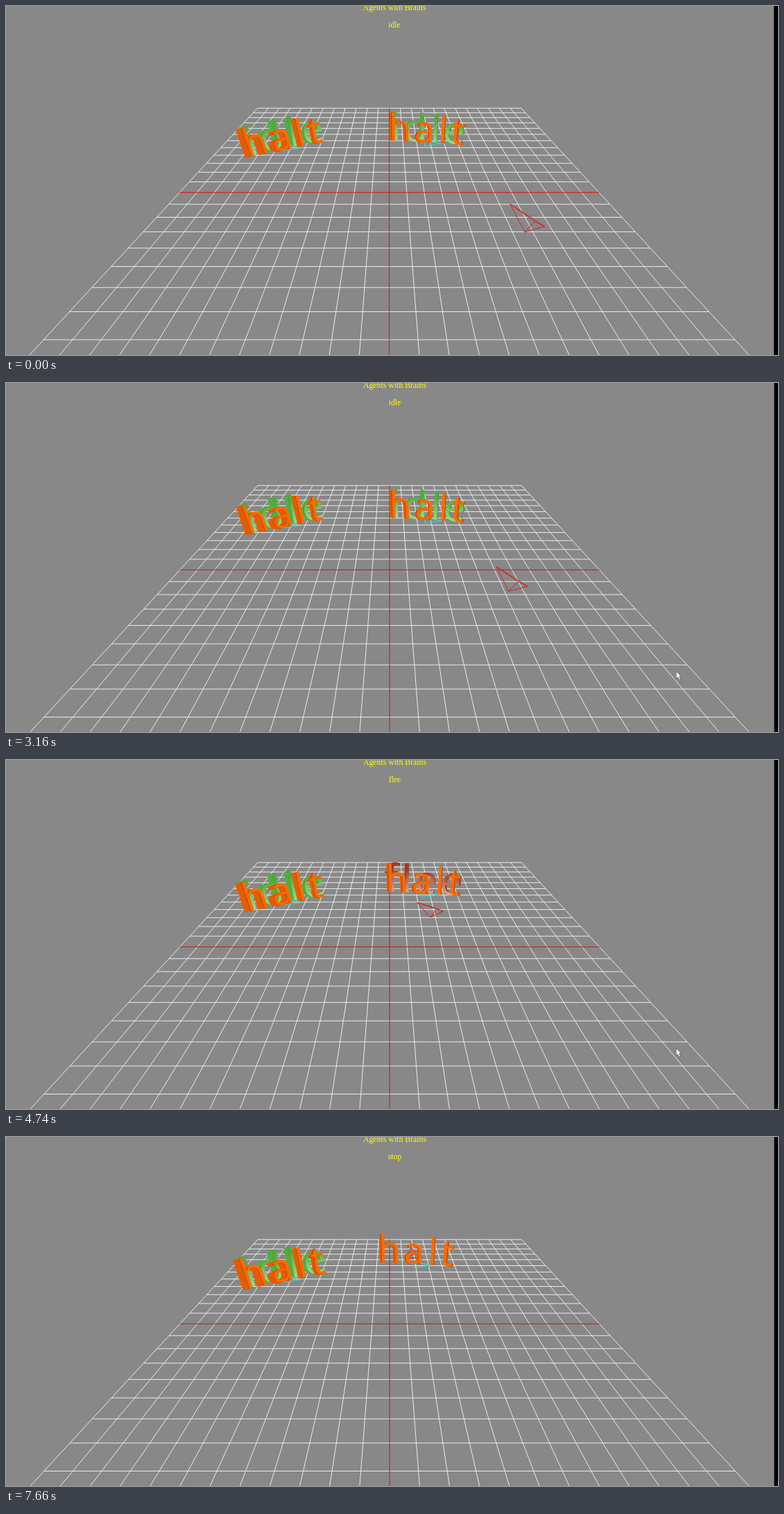
Animation of 1113x503 px, one loop 7720 ms. Source, as an HTML page with a canvas:

```html
<!DOCTYPE html>
<html lang="en">
<head>
<meta charset="utf-8">
<title>Agents with Brains</title>
<style>
  html, body { margin: 0; width: 100%; height: 100%; overflow: hidden; background: #888; }
  canvas { display: block; }
</style>
</head>
<body>
<canvas id="stage" width="1113" height="503"></canvas>
<script>
const ctx = document.getElementById('stage').getContext('2d');
const LOOP = 7720, FLEE_AT = 4190, STOP_AT = 5240;

const mix = (a, b, p) => a + (b - a) * p;
const progress = (time, start, end) => Math.min(Math.max((time - start) / (end - start), 0), 1);
const smooth = p => p * p * (3 - 2 * p);
const easeOut = p => 1 - (1 - p) ** 2;

function line(color, ...points) {
  ctx.strokeStyle = color;
  ctx.lineWidth = 1;
  ctx.beginPath();
  for (const [x, y] of points) ctx.lineTo(x, y);
  ctx.stroke();
}

// Perspective floor: CELLS rows and columns on each side of the centre.
const CELLS = 12, CENTER_X = 553.1, HORIZON = -58.3, EYE = 20.35, DROP = 327.6, CELL = 25.2;
function project(column, row, height = 0) {
  const scale = EYE / (EYE - row);
  return [CENTER_X + column * CELL * scale, HORIZON + (DROP - height * CELL) * scale];
}

function drawFloor(red) {
  const drawPair = (i, color) => {
    line(color, project(-CELLS, i), project(CELLS, i));
    line(color, project(i, -CELLS), project(i, CELLS));
  };
  for (let i = 1; i <= CELLS; i++) {
    drawPair(-i, '#ebebeb');
    drawPair(i, '#ebebeb');
  }
  drawPair(0, red);
}

// Wire pyramid lying on the floor; heading 0 points away from the viewer.
function drawPyramid(color, { column, row, heading }, size = 1) {
  const sin = Math.sin(heading), cos = Math.cos(heading);
  const corner = (ahead, side, height) => project(
    column + size * (side * cos - ahead * sin),
    row - size * (ahead * cos + side * sin), size * height);
  const nose = corner(1.94, 0, 0), top = corner(0, 0, .37);
  const left = corner(0, -.6, 0), right = corner(0, .6, 0);
  line(color, nose, right, left, nose, top, right);
  line(color, left, top);
}

const ORANGE = { top: '#ff6a00', bottom: '#ff6a00', side: '#e45d00', edge: '#b84700' };
const GREEN = { top: '#4fae38', bottom: '#98dc8a', side: '#58ab45', edge: '#4a9a38' };
const RED = { top: '#a03b22', bottom: '#e0a292', side: '#a04c38', edge: '#8c3a26' };

// Lean and depth run from the first letter of a word to the last.
const leftAgent = { x: 366, y: 215, spacing: 5, slope: -.2, lean: [.34, .16], depth: [-9, -4],
  body: { column: -7.4, row: -5, heading: -Math.PI / 2 } };
const rightAgent = { x: 569, y: 195, spacing: 4, slope: .06, lean: [.02, -.1], depth: [-3, 2],
  body: { column: 2.56, row: -5.6, heading: -Math.PI / 2 } };

function drawWord(text, size, agent, paint, dx = 0, dy = 0) {
  const { spacing, slope, lean, depth } = agent;
  ctx.font = `500 ${size}px "Open Sans", sans-serif`;
  ctx.textAlign = 'center';
  const face = ctx.createLinearGradient(0, -size * .75, 0, 0);
  face.addColorStop(.2, paint.top);
  face.addColorStop(1, paint.bottom);
  let pen = 0, lastWidth = 0;
  [...text].forEach((letter, i) => {
    const p = i / (text.length - 1);
    const reach = mix(...depth, p);
    const width = ctx.measureText(letter).width;
    if (i) pen += (lastWidth + width) / 2 + spacing;
    lastWidth = width;
    ctx.save();
    ctx.transform(1, slope, mix(...lean, p), 1, agent.x + dx + pen, agent.y + dy + pen * slope);
    for (let step = Math.ceil(Math.abs(reach)); step > 0; step--) {
      ctx.fillStyle = step > 1 ? paint.side : paint.edge;
      ctx.fillText(letter, Math.sign(reach) * step, 0);
    }
    ctx.fillStyle = face;
    ctx.fillText(letter, 0, 0);
    ctx.restore();
  });
}

function drawMood(agent, state) {
  if (state !== 'stop') drawWord(state, 55, agent, state === 'idle' ? GREEN : RED, -6, -1);
  drawPyramid('#2fd6d6', agent.body, .65);
}

// Two straight runs at constant speed, then a slowing approach.
function hunter(time) {
  const setOff = progress(time, 2820, 3240);
  const chase = progress(time, 3240, 5070);
  const arrive = easeOut(progress(time, 5070, 7100));
  const turn = smooth(progress(time, 3200, 3640));
  const turnBack = smooth(progress(time, 5070, 5900));
  return {
    column: 7.17 - .47 * setOff - 4.32 * chase - .38 * arrive,
    row: 2.83 - 1.56 * setOff - 5.71 * chase - 3.86 * arrive,
    heading: .31 + .36 * turn - .58 * turnBack
  };
}

function within(transform, paint) {
  ctx.save();
  transform();
  paint();
  ctx.restore();
}

function drawAgents(time, state) {
  const flight = smooth(progress(time, 4400, 5300));
  const nearer = () => {
    ctx.translate(402, 202);
    ctx.scale(1 + .065 * flight, 1 + .065 * flight);
    ctx.translate(-402, -202);
  };
  const away = () => ctx.translate(-15.5 * flight, -14 * flight);

  within(nearer, () => {
    drawMood(leftAgent, 'idle');
    drawWord('halt', 53, leftAgent, ORANGE);
  });
  within(away, () => drawMood(rightAgent, state));
  drawPyramid('#d81e1e', hunter(time));
  within(away, () => drawWord('halt', 53, rightAgent, ORANGE));
}

function drawLabels(state) {
  ctx.fillStyle = '#ff0';
  ctx.font = '11.8px "Liberation Serif", serif';
  ctx.textAlign = 'center';
  ctx.fillText('Agents with Brains', 560.5, 6.5);
  ctx.fillText(state, 560.5, 31.5);
}

const arrow = new Path2D('M0 0V9.5L2.2 7.5 4 11.5 5.4 10.9 3.7 7H6.5Z');
function drawPointer(time) {
  if (time < 1740 || time > 7190) return;
  const enter = progress(time, 1740, 1900);
  const rise = progress(time, 1900, 2150);
  const leave = progress(time, 6950, 7190);
  ctx.save();
  ctx.translate(1098.5 - 118 * enter - 14 * rise + 49 * leave, 501 - 16 * enter - 69 * rise - 80 * leave);
  ctx.fillStyle = '#fff';
  ctx.strokeStyle = '#222';
  ctx.lineWidth = .8;
  ctx.stroke(arrow);
  ctx.fill(arrow);
  ctx.restore();
}

function draw(time) {
  const state = time < FLEE_AT ? 'idle' : time < STOP_AT ? 'flee' : 'stop';
  const settle = progress(time, 70, 1580);
  const dim = mix(15, 32, settle);

  ctx.fillStyle = '#888';
  ctx.fillRect(0, 0, 1113, 503);
  ctx.save();
  ctx.translate((settle - 1) / 2, (settle - 1) / 2);
  drawFloor(`rgb(${mix(225, 180, settle)}, ${dim}, ${dim})`);
  drawLabels(state);
  drawAgents(time, state);
  ctx.fillStyle = '#000';
  ctx.fillRect(1107.5, 0, 10, 510);
  ctx.restore();
  drawPointer(time);
}

function tick() {
  draw(performance.now() % LOOP);
  requestAnimationFrame(tick);
}
tick();
</script>
</body>
</html>
```
